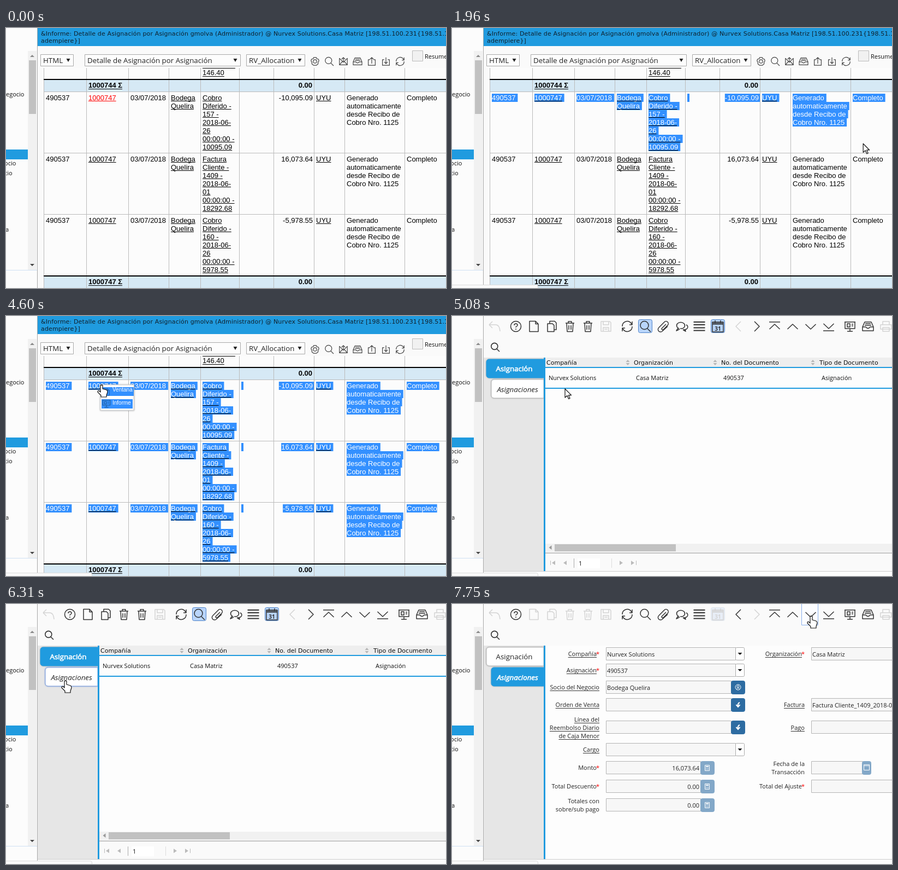
An HTML page with a canvas that plays this animation: 806 px wide and 475 px high, repeating every 8000 ms.

```html
<!DOCTYPE html>
<html lang="es">
<head>
<meta charset="utf-8">
<style>
html, body { margin: 0; width: 100%; height: 100%; overflow: hidden; background: #fff; }
canvas { display: block; }
</style>
</head>
<body>
<canvas id="stage" width="806" height="475"></canvas>
<script>
const ctx = document.getElementById('stage').getContext('2d');
const LOOP = 8000;
const BLUE = '#209bdf', INK = '#333', SELECT = '#3390ff';
const UI = '11px "Open Sans", sans-serif';
const BIG = '13.33px "Open Sans", sans-serif';
const WIDE = '11px "DejaVu Sans", sans-serif';
const CELL = '13px "Liberation Sans", Arial, sans-serif';
const COMPANY = 'Nurvex Solutions';

const ICONS = {
  undo: 'M-10-3L-4-9M-10-3L-4 3M-10-3H2Q9-3 10 9',
  help: 'M9.5 0A9.5 9.5 0 1 1-9.5 0A9.5 9.5 0 1 1 9.5 0M-3-2Q-3-5 0-5Q3-5 3-2Q3-1 0 1V2M0 4V6',
  page: 'M-8-9.5H3L8-4.5V9.5H-8ZM3-9.5V-4.5H8',
  copy: 'M-8-5H1L4-2V9.5H-8ZM-4-5V-9.5H5L8-6.5V6H4',
  trash: 'M-8-6H8M-3-6V-9H3V-6M-6-6L-5 9.5H5L6-6M-2-2V6M2-2V6',
  save: 'M-9-9H7L9-7V9H-9ZM-5-9V-3H5V-9M-5 9V2H5V9M-3 5H3',
  refresh: 'M-9 0A9 9 0 0 1 7-6L9-3M9-9V-3H4M9 0A9 9 0 0 1-7 6L-9 3M-9 9V3H-4',
  search: 'M6-2A7.5 7.5 0 1 1-9-2A7.5 7.5 0 1 1 6-2M4 4L10 10',
  clip: 'M5-4L-3 4A2 2 0 0 0 0 6L8-2A4 4 0 0 0 2-8L-8 2A4.5 4.5 0 0 0-2 9L8 0',
  chat: 'M-4 4A7.5 6 0 1 1 2 4L-2 4M4 6A7 5 0 0 0 9-3M-6 3L-9 8L-3 5M3 6L8 9L7 5',
  lines: 'M-10.5-8H10.5M-10.5-3H10.5M-10.5 2.5H10.5M-10.5 7.5H10.5',
  calendar: 'M-10-8H10V10H-10ZM-10-4H10M-10-6H10M-5-11V-6M5-11V-6',
  prev: 'M4-9L-5 0L4 9',
  next: 'M-4-9L5 0L-4 9',
  first: 'M-10-8H10M-9.5 5L0-4L9.5 5',
  up: 'M-9.5 5L0-4L9.5 5',
  down: 'M-9.5-4L0 5L9.5-4',
  last: 'M-9.5-5L0 4L9.5-5M-10 8H10',
  board: 'M-10-8H10M-9-8V4H9V-8M0 4V9M-5 9H5M-5-5H0V1H-5ZM3-4H6M3-1H6',
  inbox: 'M-10 1L-6-8H6L10 1V8H-10ZM-10 1H-4Q0 6 4 1H10M-5-5H5M-6-2H6',
  printer: 'M-6-3V-9H6V-3M-10-3H10V5H-10ZM-6 2H6V9H-6Z',
  gear: 'M-3-9H3L4-6L8-5L9-1L7 2L7 6L3 9H-3L-7 6V2L-9-1L-8-5L-4-6ZM4 0A4 4 0 1 1-4 0A4 4 0 1 1 4 0',
  mail: 'M-9-7V8H9V-7L0 2ZM-9 8L-2 0M9 8L2 0M0 2V-8M-4-5L0-9L4-5',
  upload: 'M-4-4H-8V9H8V-4H4M0 5V-9M-4-5L0-9L4-5',
  download: 'M-4-4H-8V9H8V-4H4M0-9V5M-4 1L0 5L4 1',
  arrow: 'M0 0V16L4 12.5L6.7 18.5L9 17.5L6.5 11.7H11.5Z',
  hand: 'M-2 1Q0-1 2 1V7L9 9Q11 10 11 13L9 19V22H-1V19L-7 13Q-7 9-4 11L-2 13Z'
};
for (const name in ICONS) ICONS[name] = new Path2D(ICONS[name]);

function rect(x, y, w, h, color) {
  ctx.fillStyle = color;
  ctx.fillRect(x, y, w, h);
}

function box(x, y, w, h, fill, stroke, radius = 0) {
  ctx.beginPath();
  ctx.roundRect(x + .5, y + .5, w - 1, h - 1, radius);
  ctx.fillStyle = fill;
  ctx.fill();
  ctx.strokeStyle = stroke;
  ctx.lineWidth = 1;
  ctx.stroke();
}

function text(s, x, y, font = UI, color = '#111', align = 'left') {
  ctx.font = font;
  ctx.textAlign = align;
  ctx.fillStyle = color;
  ctx.fillText(s, x, y);
  return ctx.measureText(s).width;
}

function icon(name, x, y, { scale = 1, color = INK, width = 1.5, fill } = {}) {
  ctx.save();
  ctx.translate(x, y);
  ctx.scale(scale, scale);
  ctx.lineWidth = width;
  ctx.lineJoin = 'round';
  ctx.strokeStyle = color;
  if (fill) { ctx.fillStyle = fill; ctx.fill(ICONS[name]); }
  ctx.stroke(ICONS[name]);
  ctx.restore();
}

// Points sideways when ry is 0, otherwise up or down.
function triangle(x, y, rx, ry, color) {
  ctx.beginPath();
  if (ry) { ctx.moveTo(x - rx, y - ry); ctx.lineTo(x + rx, y - ry); ctx.lineTo(x, y + ry); }
  else { ctx.moveTo(x - rx, y); ctx.lineTo(x + rx, y - 4); ctx.lineTo(x + rx, y + 4); }
  ctx.fillStyle = color;
  ctx.fill();
}

// Pointer stops: time, x, y, and 1 when the way to this stop is eased.
const STOPS = [
  [280, 808, 41], [970, 66, 126, 1], [1300, 66, 126], [1420, 471, 147],
  [1700, 690, 168], [2080, 782, 231], [2320, 797, 364], [3070, 797, 364],
  [3600, 270, 120, 1], [3820, 175, 126], [4810, 175, 126], [5080, 207, 133, 1],
  [5410, 207, 133], [6190, 109, 140, 1], [6850, 109, 140], [7630, 658, 22, 1]
];

function pointerAt(t) {
  const i = STOPS.findIndex(s => s[0] > t);
  if (i === 0) return [830, 41];
  if (i < 0) return STOPS.at(-1).slice(1, 3);
  const [t0, x0, y0] = STOPS[i - 1], [t1, x1, y1, eased] = STOPS[i];
  let u = (t - t0) / (t1 - t0);
  if (eased) u = u * u * (3 - 2 * u);
  return [x0 + (x1 - x0) * u, y0 + (y1 - y0) * u];
}

function drawSidebar() {
  rect(0, 0, 57, 475, '#fcfcfc');
  rect(40, 42, 16, 400, '#f1f1f1');
  rect(42, 59, 13, 98, '#c1c1c1');
  triangle(48, 51, 4, -2, '#8a8a8a');
  triangle(48, 433, 4, 2, '#444');
  rect(0, 222, 40, 18, BLUE);
  text('egocio', 0, 125);
  text('ocio', -3, 251);
  text('cio', -3, 269);
  text('a', -1, 372);
  rect(0, 442, 57, 1, '#cfe0f3');
  rect(57, 0, 1, 475, '#a8a8a8');
}

function select(label, x, w) {
  box(x, 48, w, 22, '#fdfdfd', '#a9a9a9');
  text(label, x + 5, 64, BIG, '#222');
  triangle(x + w - 10, 59, 3.5, 3, '#222');
}

const COLUMNS = [69, 147, 224, 298, 356, 427, 490, 564, 620, 730];
const LINKS = [1, 3, 4, 7];
const NOTE = ['Generado', 'automaticamente', 'desde Recibo de', 'Cobro Nro. 1125'];
const ROWS = [
  { doc: ['Cobro', 'Diferido -', '157 -', '2018-06-', '26', '00:00:00 -', '10095.09'], sum: '-10,095.09' },
  { doc: ['Factura', 'Cliente -', '1409 -', '2018-06-', '01', '00:00:00 -', '18292.68'], sum: '16,073.64' },
  { doc: ['Cobro', 'Diferido -', '160 -', '2018-06-', '26', '00:00:00 -', '5978.55'], sum: '-5,978.55' }
].map(r => [['490537'], ['1000747'], ['03/07/2018'], ['Bodega', 'Quelira'], r.doc,
  [''], [r.sum], ['UYU'], NOTE, ['Completo']]);

function drawCell(lines, row, col, selected) {
  lines.forEach((line, i) => {
    ctx.font = CELL;
    const width = ctx.measureText(line).width;
    const x = col === 6 ? 562 - width : COLUMNS[col] + 4;
    const base = 132 + row * 112 + i * 15;
    const tail = row === 2 && col === 9 ? 0 : col === 6 ? 2 : 4;
    if (selected) rect(x, base - 12, width + tail, 15, SELECT);
    const hot = row === 0 && col === 1 && !selected;
    const color = selected ? '#fff' : hot ? '#f00' : '#000';
    text(line, x, base, CELL, color);
    if (LINKS.includes(col)) rect(x, base + 1, width, 1, hot ? '#f00' : '#000');
  });
}

function drawTotal(top, label) {
  rect(69, top + 2, 737, 21, '#d6e9f5');
  COLUMNS.forEach(x => rect(x, top + 2, 1, 21, '#bbb'));
  rect(69, top, 737, 2, '#000');
  const bold = 'bold ' + CELL;
  const width = text(label, 151, top + 16, bold, '#000');
  rect(151, top + 18, width, 1, '#000');
  text('0.00', 561, top + 16, bold, '#000', 'right');
}

function lastSelected(t) {
  if (t < 1300) return -1;
  if (t >= 2320) return 29;
  const [x, y] = pointerAt(t);
  const row = Math.min(2, Math.max(0, Math.floor((y - 116) / 112)));
  return row * 10 + COLUMNS.filter(c => c <= x).length - 1;
}

function drawPopup() {
  ctx.shadowColor = '#0004';
  ctx.shadowBlur = 3;
  box(172, 125, 63, 48, '#fff', '#ccc');
  ctx.shadowBlur = 0;
  rect(176, 130, 58, 16, SELECT);
  rect(175, 152, 57, 17, SELECT);
  const small = '10px "Liberation Sans", Arial, sans-serif';
  text('Ventana', 195, 138, small, '#fff');
  text('Informe', 195, 162, small, '#fff');
  icon('page', 184, 139, { scale: .65, color: '#235c96' });
  icon('board', 184, 160, { scale: .75, color: '#235c96' });
}

function drawReport(t) {
  rect(58, 0, 748, 475, '#fafafa');
  rect(58, 0, 748, 33, BLUE);
  ctx.letterSpacing = '0.15px';
  text(`&Informe: Detalle de Asignación por Asignación gmolva (Administrador) @ ${COMPANY}.Casa Matriz [198.51.100.231{198.51.100.231}`, 64, 14, WIDE, '#10202c');
  text('adempiere}]', 64, 27, WIDE, '#10202c');
  ctx.letterSpacing = '0px';
  select('HTML', 63, 61);
  select('Detalle de Asignación por Asignación', 144, 286);
  select('RV_Allocation', 440, 108);
  ['gear', 'search', 'mail', 'inbox', 'upload', 'download', 'refresh'].forEach((name, i) =>
    icon(name, 566 + i * 26, 61, { scale: .8, color: '#444' }));
  box(744, 41, 20, 20, '#f1f1f1', '#bbb');
  text('Resumen', 767, 56);

  rect(69, 73, 737, 380, '#fcfcfc');
  COLUMNS.forEach(x => rect(x, 73, 1, 380, '#bbb'));
  // The tail of a cell scrolled out at the top.
  rect(360, 73, 60, 1, '#000');
  rect(360, 88, text('146.40', 360, 86, CELL, '#000'), 1, '#000');
  drawTotal(93, '1000744 Σ');
  [116, 228, 340].forEach(y => rect(69, y, 737, 1, '#bbb'));
  const last = lastSelected(t);
  ROWS.forEach((cells, row) => cells.forEach((lines, col) =>
    drawCell(lines, row, col, row * 10 + col <= last)));
  drawTotal(452, '1000747 Σ');
  if (t >= 3880 && t < 4630) drawPopup();
}

const TOOLS = [['undo', 78], ['help', 117], ['page', 150], ['copy', 183], ['trash', 216], ['trash', 249],
  ['save', 282], ['refresh', 321], ['search', 354], ['clip', 387], ['chat', 420], ['lines', 453],
  ['calendar', 487], ['prev', 525], ['next', 558], ['first', 591], ['up', 624], ['down', 657],
  ['last', 690], ['board', 729], ['inbox', 762], ['printer', 795]];
const GRID_OFF = ['undo', 'save', 'prev', 'printer'];
const FORM_OFF = ['undo', 'page', 'copy', 'trash', 'save', 'calendar', 'next', 'printer'];

function drawTools(form, pointer) {
  rect(58, 0, 748, 76, '#fafafa');
  if (!form) [341, 474].forEach(x => box(x, 6, 26, 25, '#b9d5fb', '#4d82c8', 3));
  else box(474, 6, 26, 25, '#e8eef7', '#e0e6ee', 3);
  if (form && pointer[0] > 640 && pointer[1] < 38) box(640, -2, 31, 41, '#fcfdff', '#8ab0ee');
  const off = form ? FORM_OFF : GRID_OFF;
  for (const [name, x] of TOOLS) {
    const color = off.includes(name) ? '#d4d4d4' : INK;
    icon(name, x, 19, { color, width: name === 'lines' ? 2 : 1.5 });
    if (name === 'calendar') text('31', x, 27, 'bold 10px "Open Sans", sans-serif', color, 'center');
  }
  icon('search', 79, 57, { scale: .8, width: 2 });
}

function tab(label, x, y, h, active, italic, focus) {
  ctx.shadowColor = focus ? '#3b6fd0' : '#0006';
  ctx.shadowBlur = 3;
  ctx.beginPath();
  ctx.roundRect(x, y, 168 - x, h, [5, 0, 0, 5]);
  ctx.fillStyle = active ? BLUE : '#fff';
  ctx.fill();
  ctx.shadowBlur = 0;
  ctx.strokeStyle = active ? BLUE : focus ? '#7f9fdc' : '#b5b5b5';
  ctx.lineWidth = 1;
  ctx.stroke();
  const cx = italic ? 120 : 114, base = y + (italic ? 23 : 22);
  text(label, cx, base, (italic ? 'italic ' : '') + BIG, active ? '#fff' : '#222', 'center');
  if (active) {
    ctx.strokeStyle = '#fff';
    ctx.lineWidth = .6;
    ctx.strokeText(label, cx, base);
  }
}

function drawTabs(form, focus) {
  rect(58, 76, 110, 391, '#e6e6e6');
  tab('Asignación', 63, 79, 34, !form, false, false);
  tab('Asignaciones', 72, 116, 34, form, true, focus);
  rect(168, 76, 3, 391, BLUE);
  rect(58, 466, 748, 1, '#ccc');
}

function drawGrid() {
  rect(171, 76, 635, 18, '#eeeeee');
  [['Compañía', 173, COMPANY], ['Organización', 333, 'Casa Matriz'],
    ['No. del Documento', 493, '490537'], ['Tipo de Documento', 673, 'Asignación']]
    .forEach(([head, x, value]) => {
      text(head, x, 89, WIDE);
      text(value, x + 4, 117);
    });
  [322, 482, 661].forEach(x => {
    triangle(x, 82, 3.5, -2, '#b5b5b5');
    triangle(x, 88, 3.5, 2, '#b5b5b5');
  });
  rect(171, 93, 635, 2, BLUE);
  rect(171, 131, 635, 2, BLUE);
  rect(171, 416, 635, 15, '#f1f1f1');
  rect(188, 417, 222, 13, '#c1c1c1');
  triangle(180, 423, 2.5, 0, '#999');
  rect(171, 432, 635, 2, '#c4c4c4');
  rect(171, 434, 635, 32, '#fafafa');
  rect(230, 443, 41, 18, '#fff');
  text('1', 232, 456);
  [186, 207].forEach(x => triangle(x, 451, 3, 0, '#bbb'));
  [310, 331].forEach(x => triangle(x, 451, -3, 0, '#bbb'));
  [180, 337].forEach(x => rect(x, 447, 1, 8, '#bbb'));
  rect(223, 443, 1, 17, '#aaa');
  rect(292, 443, 1, 17, '#ddd');
}

function label(s, right, base, { link, star } = {}) {
  if (star) text('*', right, base, UI, '#f00', 'right');
  const end = right - (star ? 5 : 0);
  const width = text(s, end, base, UI, '#222', 'right');
  if (link) rect(end - width, base + 2, width, 1, '#333');
}

function field(x, y, w, value = '', align = 'left') {
  box(x, y, w, 24, '#f7f7f7', '#b4b4b4');
  text(value, align === 'left' ? x + 2 : x + w - 3, y + 17, UI, '#222', align);
}

function combo(y, value) {
  field(282, y, 238, value);
  box(519, y, 17, 24, '#fff', '#aaa', 2);
  triangle(527.5, y + 12, 4, 2, '#111');
}

function button(x, y, w, fill) {
  box(x, y, w, 25, fill, fill, 3);
}

function lookup(y, value, person) {
  field(282, y, 230, value);
  button(511, y, 26, '#2d6ca2');
  ctx.strokeStyle = '#fff';
  ctx.lineWidth = 1;
  ctx.beginPath();
  if (person) {
    ctx.arc(524, y + 12, 5, 0, 7);
    ctx.moveTo(526, y + 11);
    ctx.arc(524, y + 11, 2, 0, 7);
    ctx.moveTo(521, y + 16);
    ctx.quadraticCurveTo(524, y + 11, 527, y + 16);
  } else {
    ctx.lineWidth = 2;
    ctx.moveTo(527, y + 8);
    ctx.quadraticCurveTo(523, y + 9, 524, y + 15);
    ctx.moveTo(520.5, y + 12);
    ctx.lineTo(524, y + 16);
    ctx.lineTo(527.5, y + 12);
  }
  ctx.stroke();
}

function amount(y, value) {
  field(282, y, 174, value, 'right');
  button(455, y, 26, '#83a8c8');
  box(463, y + 7, 9, 11, '#83a8c8', '#fff');
  rect(465, y + 9, 5, 2, '#fff');
  [465, 467, 469].forEach(x => [13, 15].forEach(dy => rect(x, y + dy, 1, 1, '#fff')));
}

function drawForm(second) {
  const link = true, star = true;
  label('Compañía', 270, 95, { link, star });
  label('Asignación', 270, 125, { link, star });
  label('Socio del Negocio', 270, 156, { link });
  label('Orden de Venta', 270, 188, { link });
  ['Línea del', 'Reembolso Diario', 'de Caja Menor'].forEach((s, i) => label(s, 270, 215 + i * 15, { link }));
  label('Cargo', 270, 270, { link });
  label('Monto', 270, 303, { star });
  label('Total Descuento', 270, 337, { star });
  label('Totales con', 270, 364);
  label('sobre/sub pago', 270, 379);
  label('Organización', 646, 95, { link, star });
  label('Factura', 646, 188, { link });
  label('Pago', 646, 230, { link });
  label('Fecha de la', 646, 296);
  label('Transacción', 646, 311);
  label('Total del Ajuste', 646, 337, { star });

  combo(79, COMPANY);
  combo(109, '490537');
  lookup(140, 'Bodega Quelira', true);
  lookup(172, '');
  lookup(213, '');
  combo(254, '');
  amount(287, second ? '16,073.64' : '-10,095.09');
  amount(321, '0.00');
  amount(355, '0.00');
  field(658, 79, 180, 'Casa Matriz');
  field(658, 172, 180, second ? 'Factura Cliente_1409_2018-06-01' : '');
  field(658, 213, 180, second ? '' : 'Cobro Diferido_157_2018-06-26');
  field(658, 321, 180);
  field(658, 287, 95);
  button(751, 287, 17, '#83a8c8');
  box(754, 293, 11, 11, '#83a8c8', '#fff');
  rect(754, 295, 11, 1, '#fff');
}

function drawWindow(t, pointer) {
  const form = t >= 6400;
  rect(58, 0, 748, 475, '#fdfdfd');
  drawTools(form, pointer);
  drawTabs(form, t >= 6220 && !form);
  if (form) drawForm(t >= 7750);
  else drawGrid();
}

function drawPointer(t, [x, y]) {
  const onLink = t >= 3760 && t < 4870;
  const onTab = t >= 5410 && x < 168 && y < 151;
  const onTool = t >= 6850 && y < 38;
  const shape = onLink || onTab || onTool ? 'hand' : 'arrow';
  icon(shape, x, y, { color: '#111', width: 1.2, fill: '#fff' });
}

function draw(t) {
  const pointer = pointerAt(t);
  drawSidebar();
  if (t < 4870) drawReport(t);
  else drawWindow(t, pointer);
  if ((t >= 1300 && t < 2080) || t >= 3820) box(-4, 469, 162, 12, '#fafafa', '#dcdcdc', 3);
  drawPointer(t, pointer);
}

function frame() {
  draw(performance.now() % LOOP);
  requestAnimationFrame(frame);
}
frame();
</script>
</body>
</html>
```
